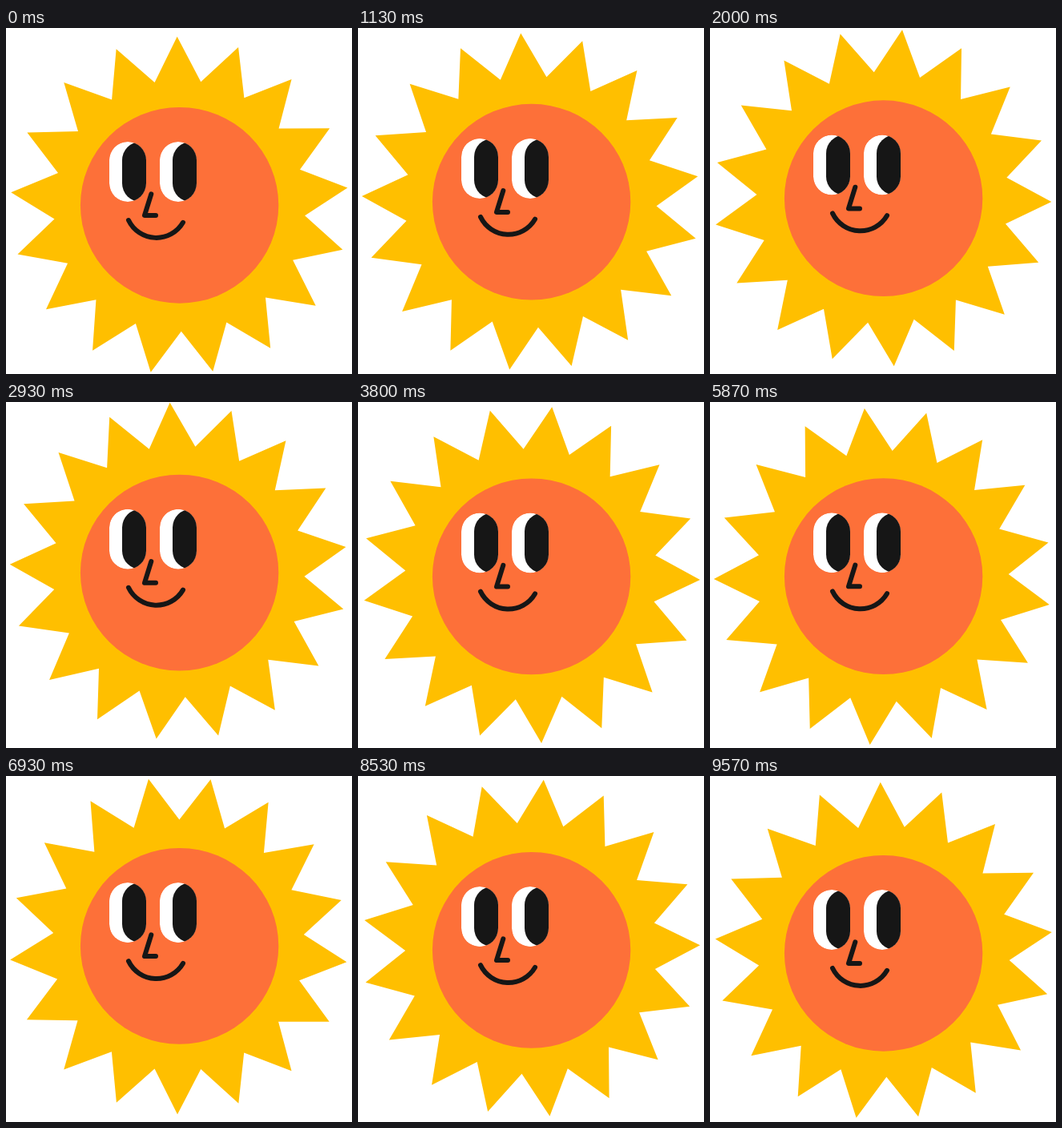
Write an HTML page that moves like this. It is 432 by 432 pixels and loops after 9610 ms.

```html
<!DOCTYPE html>
<html lang="en">
<head>
<meta charset="utf-8">
<title>Smiling sun</title>
<style>
  html, body { margin: 0; height: 100%; overflow: hidden; background: #fff; }
  svg { display: block; width: 100vw; height: 100vh; }
  .line { fill: none; stroke: #161616; stroke-width: 6; stroke-linecap: round; stroke-linejoin: round; }
</style>
</head>
<body>
<svg viewBox="0 0 432 432">
  <defs>
    <rect id="capsule" width="46" height="75" rx="23"/>
    <clipPath id="eyeShape"><use href="#capsule"/></clipPath>
    <g id="eye" clip-path="url(#eyeShape)">
      <use href="#capsule" fill="#fff"/>
      <use href="#capsule" x="16" fill="#161616"/>
    </g>
  </defs>
  <!-- y = 0 is the centre of the face -->
  <g id="sun">
    <polygon id="rays" fill="#ffbf00"/>
    <ellipse cx="216.6" rx="123.7" ry="122.4" fill="#fd7039"/>
    <use href="#eye" x="129" y="-79.3"/>
    <use href="#eye" x="192" y="-79.3"/>
    <path class="line" d="M181.3-14 173 12.7H187"/>
    <path class="line" d="M153 18.7A38.5 38.5 0 0 0 221 21.5"/>
  </g>
</svg>
<script>
const LOOP = 9610, LAST_STEP = 239, CYCLE = 120;
const RAYS = 17, TIP = 211, NOTCH = 157, START = -0.8, TURN = 1.4205;
const sun = document.getElementById('sun');
const rays = document.getElementById('rays');

// The star sits slightly off its pivot, so it wobbles as it turns.
rays.setAttribute('points', Array.from({ length: RAYS * 2 }, (_, i) => {
  const angle = START * Math.PI / 180 + i * Math.PI / RAYS;
  const radius = i % 2 ? NOTCH : TIP;
  return [-0.4 + radius * Math.sin(angle), 1.55 - radius * Math.cos(angle)];
}).join(' '));

// Five poses per 200 ms, the first one held for two ticks of 1/30 s.
function stepAt(time) {
  const tick = Math.floor((time % 200 + 3.5) * 0.03);
  return Math.min(LAST_STEP, 5 * Math.floor(time / 200) + Math.max(0, tick - 1));
}

function draw() {
  const step = stepAt(performance.now() % LOOP) % CYCLE;
  const y = 216.7 + 4.6 * Math.cos(2 * Math.PI * step / CYCLE);
  sun.setAttribute('transform', `translate(0 ${y})`);
  rays.setAttribute('transform', `translate(217 -1) rotate(${step * TURN})`);
  requestAnimationFrame(draw);
}
draw();
</script>
</body>
</html>
```
